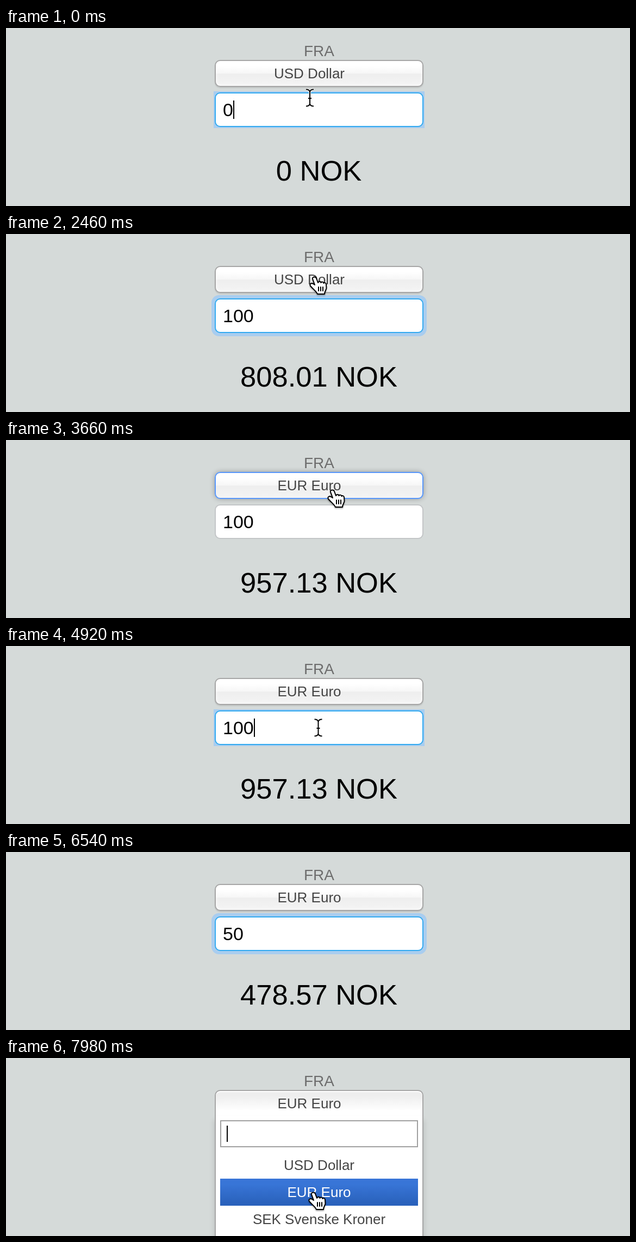
Animation of 1148x329 px, one loop 8 s. Source, as an HTML page:

```html
<!DOCTYPE html>
<html lang="no">
<head>
<meta charset="utf-8">
<title>Currency converter</title>
<style>
html, body { margin: 0; width: 100%; height: 100%; overflow: hidden; }
body { position: relative; background: #d5dad9; font: 26px "Liberation Sans", Arial, sans-serif; color: #444; }
div { position: absolute; box-sizing: border-box; white-space: pre; text-align: center; }
#from { left: 476px; width: 200px; top: 23px; line-height: 40px; font-size: 28px; color: #6d6d6d; }
#button {
  left: 384px; top: 59px; width: 384px; height: 50px; line-height: 46px; padding-right: 36px;
  border: 2px solid #a6a6a6; border-radius: 10px;
  background: linear-gradient(#fff 20%, #f6f6f6 50%, #eee 52%, #f4f4f4);
  box-shadow: inset 0 0 6px #fff, 0 2px 2px rgba(0,0,0,.1);
}
#button.active { border-color: #5897fb; box-shadow: 0 0 10px rgba(0,0,0,.3); }
#button.open {
  border-color: #a6a6a6; border-radius: 10px 10px 0 0;
  background: linear-gradient(#eee 20%, #fff 80%); box-shadow: inset 0 2px 0 #fff;
}
#field {
  left: 384px; top: 119px; width: 384px; height: 64px; line-height: 60px; padding-left: 13px;
  text-align: left; font-size: 34px; color: #000;
  border: 2px solid #c3c5c7; border-radius: 10px; background: #fff;
}
#field.focus { border-color: #33aaf0; }
#ring { left: 378px; top: 113px; width: 396px; height: 76px; border-radius: 14px; background: #a9cdef; }
#ring.tight { left: 382px; top: 117px; width: 388px; height: 68px; border-radius: 0; }
.caret { position: absolute; width: 2px; background: #000; }
#field .caret { top: 13px; height: 34px; }
#result { left: 275px; width: 601px; top: 233px; line-height: 61px; font-size: 52.5px; color: #000; }
#drop {
  left: 384px; top: 107px; width: 384px; height: 260px; background: #fff;
  border: solid #a6a6a6; border-width: 0 2px; box-shadow: 0 8px 10px rgba(0,0,0,.15);
}
#search { left: 8px; top: 8px; width: 364px; height: 50px; border: 2px solid #a0a0a0; }
#search .caret { left: 10px; top: 8px; height: 30px; }
.row { left: 8px; width: 364px; height: 50px; line-height: 50px; }
.row.hot { color: #fff; background: linear-gradient(#3875d7 20%, #2a62bc 90%); }
svg { position: absolute; left: 0; top: 0; overflow: visible; filter: drop-shadow(0 2px 1px rgba(0,0,0,.3)); }
#beam { filter: none; }
</style>
</head>
<body>
<div id="from">FRA</div>
<div id="button"></div>
<div id="ring"></div>
<div id="field"><span id="value"></span><span class="caret"></span></div>
<div id="result"></div>
<div id="drop"><div id="search"><span class="caret"></span></div></div>
<svg id="hand" width="1" height="1" stroke="#000" stroke-width="2" stroke-linecap="round" stroke-linejoin="round">
  <path fill="#fff" d="M-3 3C-4-1 3-2 4 2L7 10C8 7 12 7 12.500 10C13 8 17 8 17.500 11C18 9 22 10 22 13L22.500 20C22 24 19 26 19 31H6C5 27-2 22-7 16C-9 12-5 10-2 12L1 14Z"/>
  <path d="M8 18V25M12 18V25M16 18V25"/>
</svg>
<svg id="beam" width="1" height="1" fill="none">
  <path id="stem" stroke="#fff" stroke-width="4" d="M-7-15.500Q-1-15.500 0-11Q1-15.500 7-15.500M0-11V11M-7 15.500Q-1 15.500 0 11Q1 15.500 7 15.500M-3 1H3"/>
  <use href="#stem" style="display:none"/>
</svg>
<script>
const LOOP = 8000, STEP = 60, BLINK = 500;
const currencies = [
  { name: "USD Dollar", rate: 8.0801 },
  { name: "EUR Euro", rate: 9.57132 },
  { name: "SEK Svenske Kroner" }
];
// Each event overrides part of the state and restarts the caret blink.
const events = [
  [0, { value: "0", pick: 0, focus: "field" }],
  [1200, { value: "" }],
  [1380, { value: "1" }],
  [1620, { value: "10" }],
  [1800, { value: "100" }],
  [2700, { focus: "drop" }],
  [3420, { pick: 1, focus: "button" }],
  [4440, { focus: "field" }],
  [5400, { value: "10" }],
  [5520, { value: "1" }],
  [5640, { value: "" }],
  [5820, { value: "5" }],
  [6000, { value: "50" }],
  [7560, { focus: "drop" }]
];
// Pointer stops: time, x, y.
const path = [
  [0, 559, 129], [600, 566, 150], [2040, 566, 150], [2400, 567, 80],
  [2700, 567, 80], [3100, 562, 241], [3440, 562, 241], [3660, 600, 93],
  [3780, 600, 93], [4320, 574.5, 151], [6900, 574.5, 151], [7380, 566, 82],
  [7560, 566, 82], [7920, 565, 249], [LOOP, 565, 249]
];
const hidden = [[1200, 2040], [5400, 6900]];

const $ = id => document.getElementById(id);
const show = (el, on) => { el.style.visibility = on ? "visible" : "hidden"; };
const [fieldCaret, searchCaret] = document.querySelectorAll(".caret");

const stem = $("stem").cloneNode();
stem.removeAttribute("id");
stem.setAttribute("stroke", "#000");
stem.setAttribute("stroke-width", 2);
$("beam").append(stem);

const rows = currencies.map(({ name }, i) => {
  const row = document.createElement("div");
  row.className = "row";
  row.textContent = name;
  row.style.top = 66 + i * 50 + "px";
  $("drop").append(row);
  return row;
});

function pointerAt(t) {
  const i = path.findIndex(stop => stop[0] > t);
  const [t0, x0, y0] = path[i - 1], [t1, x1, y1] = path[i];
  const p = (t - t0) / (t1 - t0), e = p * p * (3 - 2 * p);
  return [x0 + (x1 - x0) * e, y0 + (y1 - y0) * e];
}

function draw(t) {
  const past = events.filter(([at]) => at <= t);
  const { value, pick, focus } = Object.assign({}, ...past.map(e => e[1]));
  const caretOn = (t - past[past.length - 1][0]) % (2 * BLINK) < BLINK;
  const open = focus === "drop", typing = focus === "field";
  const [x, y] = pointerAt(t);

  $("button").textContent = currencies[pick].name;
  $("button").className = open ? "open" : focus === "button" ? "active" : "";
  $("value").textContent = value;
  $("field").className = typing ? "focus" : "";
  $("ring").className = caretOn ? "tight" : "";
  $("result").textContent = Math.round(value * currencies[pick].rate * 100) / 100 + " NOK";
  show($("ring"), typing);
  show(fieldCaret, typing && caretOn);

  $("drop").style.display = open ? "" : "none";
  show(searchCaret, open && caretOn);
  const hot = y >= 173 ? Math.floor((y - 173) / 50) : pick;
  rows.forEach((row, i) => row.classList.toggle("hot", i === hot));

  const visible = !hidden.some(([a, b]) => t >= a && t < b);
  const overText = y > 114 && (!open || y < 165);
  show($("hand"), visible && !overText);
  show($("beam"), visible && overText);
  for (const id of ["hand", "beam"]) $(id).style.transform = `translate(${x}px, ${y}px)`;
}

function tick() {
  const t = performance.now() % LOOP;
  draw(Math.floor(t / STEP) * STEP);
  requestAnimationFrame(tick);
}
tick();
</script>
</body>
</html>
```
